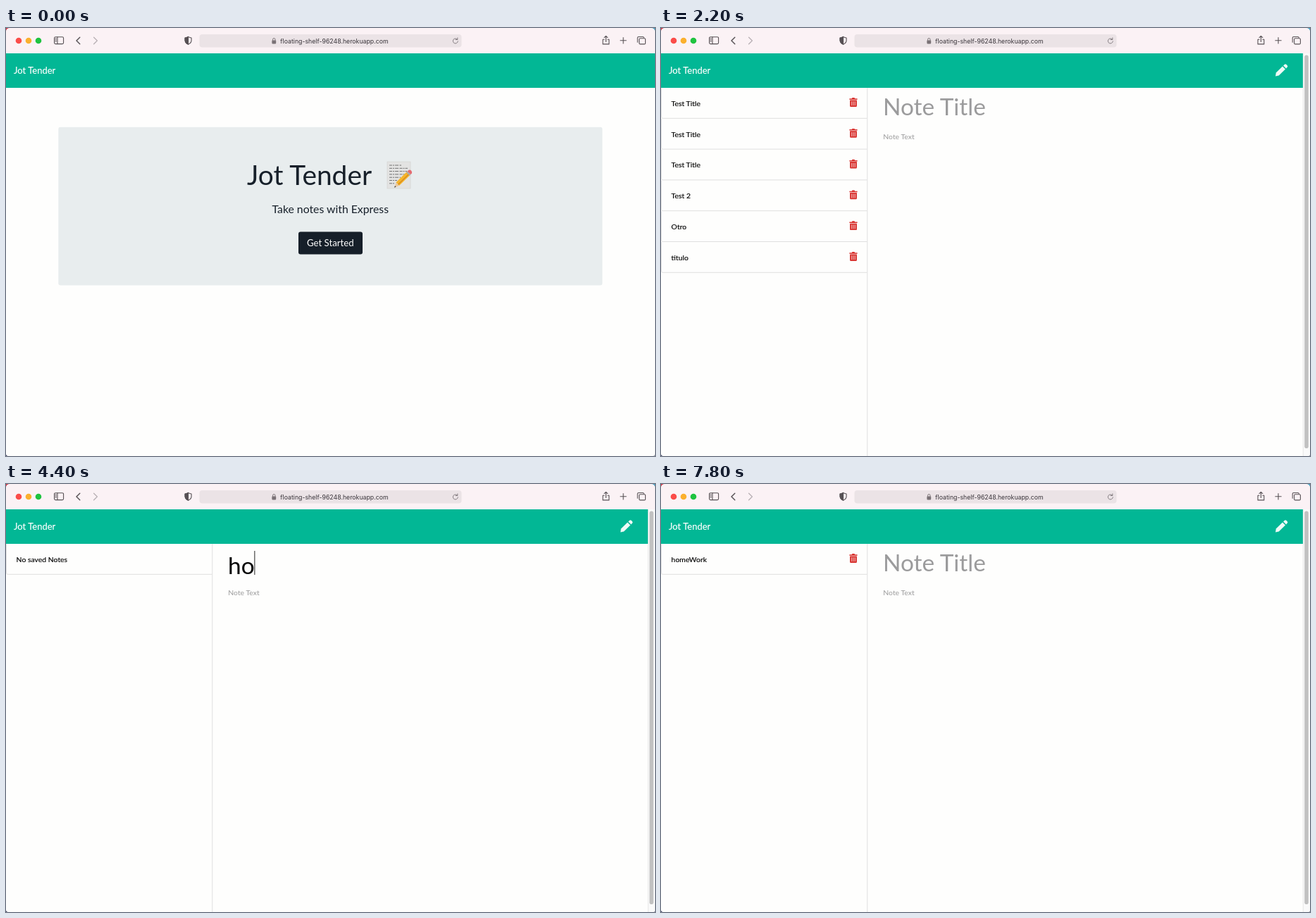
An HTML page for the animation above (8 s loop, 921 by 608 pixels).

```html
<!DOCTYPE html>
<html lang="en">
<head>
<meta charset="utf-8">
<title>Jot Tender</title>
<style>
html, body { margin: 0; width: 100%; height: 100%; overflow: hidden; background: #fefefd; }
svg { display: block; width: 921px; height: 608px; font-family: Lato, sans-serif; }
.icon { fill: none; stroke: #565054; stroke-width: 1.1; stroke-linecap: round; stroke-linejoin: round; }
.small { font-size: 10.43px; fill: #000; stroke: #000; stroke-width: .15px; }
.hint { fill: #9b9b9c; stroke: none; }
.title { font-size: 33.4px; }
.line { fill: none; stroke: #dfdfdf; }
</style>
</head>
<body>
<svg viewBox="0 0 921 608">
  <defs>
    <clipPath id="window"><path d="M0 608V6Q0 0 6 0H915Q921 0 921 6V605Q921 608 918 608H3Q0 608 0 605Z"/></clipPath>
    <clipPath id="titleBox"><rect x="312" y="86" width="590" height="42.7"/></clipPath>
    <g id="trash">
      <path fill="#d8302d" d="M267.4 100.3h3.3l.8-1.2h3l.8 1.2h3.3v1.5h-11.2zM268.1 102.5h9.8v8.2q0 1.2-1.2 1.2h-7.4q-1.2 0-1.2-1.2z"/>
      <path stroke="#fbe9e8" stroke-width=".8" d="M270.7 104.2v6M273 104.2v6M275.3 104.2v6"/>
    </g>
    <g id="pencil" fill="#eefaf7">
      <path d="M872 68.4l.8-4.8 9.2-9.2 4 4-9.2 9.2z"/>
      <path d="M883.1 53.4l1.8-1.7q1.2-1 2.4 0l1.5 1.5q1 1.2 0 2.4l-1.7 1.8z"/>
    </g>
    <g id="save">
      <path fill="#eefaf7" d="M836.3 53h9.7l3.5 3.5v9.6q0 1.4-1.4 1.4h-11.8q-1.4 0-1.4-1.4V54.4q0-1.4 1.4-1.4z"/>
      <path fill="#02b795" d="M837 55h8.2v3.8H837z"/>
      <circle cx="842" cy="63.2" r="2" fill="#02b795"/>
    </g>
  </defs>

  <rect width="460" height="300" fill="#c93a4b"/>
  <rect x="460" width="461" height="300" fill="#4a9fc0"/>
  <rect y="300" width="460" height="308" fill="#1d1f45"/>
  <rect x="460" y="300" width="461" height="308" fill="#8b8d98"/>

  <g clip-path="url(#window)">
    <rect width="921" height="608" fill="#fefefd"/>
    <rect width="921" height="36" fill="#fbf2f5"/>
    <circle cx="18" cy="18" r="4.3" fill="#fb4c49"/>
    <circle cx="32" cy="18" r="4.3" fill="#fbb02e"/>
    <circle cx="46" cy="18" r="4.3" fill="#1fc340"/>
    <g class="icon">
      <rect x="68.6" y="12.8" width="13" height="9.8" rx="1.6"/>
      <path d="M73 12.8v9.8M70 15h1.4M70 17h1.4M70 19h1.4"/>
      <path d="M104.8 13.2l-4.8 4.8 4.8 4.8" stroke-width="1.4"/>
      <path d="M124.6 13.2l4.8 4.8-4.8 4.8" stroke="#b9b1b5" stroke-width="1.3"/>
      <path d="M258.6 12.4q2.2 1.5 4.5 1.6v3.8q0 3.6-4.5 5.5-4.5-1.9-4.5-5.5V14q2.3-.1 4.5-1.6z"/>
      <path d="M258.6 12.4v10.9q-4.5-1.9-4.5-5.5V14q2.3-.1 4.5-1.6z" fill="#565054"/>
      <path d="M871.8 17.8h8.4M876 13.6V22"/>
      <path d="M896.2 20.3V14q0-1.5 1.5-1.5h6.2q1.2 0 1.4 1.4"/>
      <rect x="898.6" y="14.7" width="8.8" height="8.2" rx="1.4"/>
    </g>
    <rect x="274.5" y="9" width="372" height="18.5" rx="4" fill="#ebe3e6"/>
    <rect x="377.4" y="17.6" width="5.8" height="4.8" rx=".8" fill="#7a7276"/>
    <path d="M378.6 18v-1.6a1.7 1.9 0 0 1 3.4 0V18" fill="none" stroke="#7a7276"/>
    <text x="466" y="21.6" text-anchor="middle" font-family="Inter, sans-serif" font-size="8.75" fill="#39343a">floating-shelf-96248.herokuapp.com</text>
    <g class="icon">
      <path id="share" d="M849 16.3h-2v6.6h8.8v-6.6h-2M851.4 19.5v-8M849 13.7l2.4-2.4 2.4 2.4"/>
      <path id="reload" stroke="#7a7276" stroke-width=".9" d="M640.6 16.3a3.5 3.5 0 1 0 .7 2.6M638.2 16.5h2.6v-2.6"/>
      <path id="stop" d="M635 15.1l6 6M641 15.1l-6 6"/>
    </g>
    <rect id="progress" x="277" y="26.7" width="39" height="2" fill="#2276ea"/>

    <rect y="36" width="921" height="49" fill="#02b795"/>
    <text x="11" y="65.2" font-size="13.04" fill="#fff" stroke="#fff" stroke-width=".15">Jot Tender</text>

    <g id="home">
      <rect x="74.3" y="140.8" width="772" height="224.8" rx="3" fill="#e8edee"/>
      <text x="342" y="223" font-size="38.9" fill="#17202a">Jot Tender</text>
      <rect x="541" y="190" width="33" height="38" fill="#e3e3e2" stroke="#cfcfce" stroke-width=".6"/>
      <path fill="none" stroke="#666" stroke-width=".9" stroke-dasharray="4 1 2 1 5 1.5" d="M544 195h17M544 199.3h26M544 203.6h25M544 207.9h22M544 212.2h16M544 216.5h11M544 220.8h7"/>
      <path fill="#f5b52c" d="M553.5 219.2l16-15.6 4.6 4.7-16.2 15.8z"/>
      <path stroke="#d98a1d" stroke-width="1.4" d="M556.4 222.6l16.1-15.8"/>
      <path fill="#e9c9a0" d="M553.5 219.2l4.4 4.9-6.6 2.4z"/>
      <path fill="#444" d="M552.1 224l1.4 1.7-2.6 1z"/>
      <path fill="#a9acb0" d="M568 205l1.7-1.6 4.7 4.6-1.7 1.7z"/>
      <path fill="#e56a70" d="M569.7 203.4l1.6-1.5q1.8-1.2 3.7.6 1.8 2 .8 3.9l-1.4 1.6z"/>
      <text x="460.3" y="263.4" text-anchor="middle" font-size="15.8" fill="#17202a">Take notes with Express</text>
      <rect x="415" y="289.4" width="91" height="32" rx="3" fill="#161f29"/>
      <text x="460.3" y="310.2" text-anchor="middle" font-size="13.2" fill="#fff">Get Started</text>
    </g>

    <g id="notes">
      <rect x="911" y="36" width="10" height="572" fill="#fafafa"/>
      <path class="line" d="M911.3 36V608" stroke="#e9e9e9" stroke-width=".7"/>
      <rect x="913.2" y="38.5" width="5.6" height="558.5" rx="2.8" fill="#c1c1c1"/>
      <path class="line" d="M292.8 85V608"/>
      <g id="list"></g>
      <use href="#pencil"/>
      <use href="#save" id="saveIcon"/>
      <g clip-path="url(#titleBox)"><text id="title" class="title" x="315"></text></g>
      <text id="body" class="small" x="315.3"></text>
      <rect id="caret" width="1" fill="#222"/>
    </g>
  </g>
</svg>
<script>
const $ = id => document.getElementById(id);
const show = (id, on) => $(id).setAttribute('display', on ? 'inline' : 'none');
const attrs = (id, values) => {
  for (const key in values) $(id).setAttribute(key, values[key]);
};

const LOOP = 8000, ROW = 43.8;
const TITLES = ['Test Title', 'Test Title', 'Test Title', 'Test 2', 'Otro', 'titulo'];
const TITLE_KEYS = [[0, ''], [4200, 'h'], [4400, 'ho'], [4800, 'hom'], [5000, 'home'],
  [6000, 'homeWo'], [6200, 'homeWork'], [7200, '']];
const BODY_KEYS = [[0, ''], [6400, 'make ho'], [6600, 'make homework'], [7200, '']];

const valueAt = (keys, t) => keys.filter(([time]) => time <= t).pop()[1];
const within = (t, from, to) => t >= from && t < to;

function savedNotes(t) {
  if (t < 2600) return TITLES;
  if (t < 2800) return TITLES.slice(3);
  return t < 7200 ? [] : ['homeWork'];
}

function drawList(notes) {
  const rows = notes.length ? notes : ['No saved Notes'];
  $('list').innerHTML = rows.map((label, i) => `<g transform="translate(0 ${i * ROW})">
    <path class="line" d="M.5 85V126.3Q.5 128.3 2.5 128.3H292.5"/>
    <text class="small" x="14.6" y="110.8">${label}</text>
    ${notes.length ? '<use href="#trash"/>' : ''}</g>`).join('');
}

function drawEditor(t) {
  const title = valueAt(TITLE_KEYS, t), body = valueAt(BODY_KEYS, t);
  const inBody = body !== '';
  $('title').textContent = title || 'Note Title';
  $('body').textContent = body || 'Note Text';
  attrs('title', { class: title ? 'title' : 'title hint', y: !title ? 124 : inBody ? 131.5 : 127.5 });
  attrs('body', { class: inBody ? 'small' : 'small hint', y: inBody ? 153.7 : 157.9 });
  show('saveIcon', title && inBody);

  show('caret', within(t, 3000, 3600) || within(t, 4000, 5400) || within(t, 6000, 7000));
  const typed = inBody ? 'body' : 'title';
  const width = title ? $(typed).getComputedTextLength() : 0;
  attrs('caret', {
    x: 314.8 + width,
    y: inBody ? 144 : title ? 95 : 99.5,
    height: inBody ? 12 : title ? 34 : 29
  });
}

function draw(t) {
  const loading = within(t, 400, 600), home = t < 600;
  show('home', home);
  show('notes', !home);
  show('progress', loading);
  show('stop', loading);
  show('reload', !loading);
  attrs('share', { opacity: loading ? .4 : 1 });
  if (home) return;
  drawList(savedNotes(t));
  drawEditor(t);
}

const start = performance.now();
let last = -1;
function tick() {
  const t = Math.floor((performance.now() - start) % LOOP / 200) * 200;
  if (t !== last) draw(last = t);
  requestAnimationFrame(tick);
}
tick();
</script>
</body>
</html>
```
